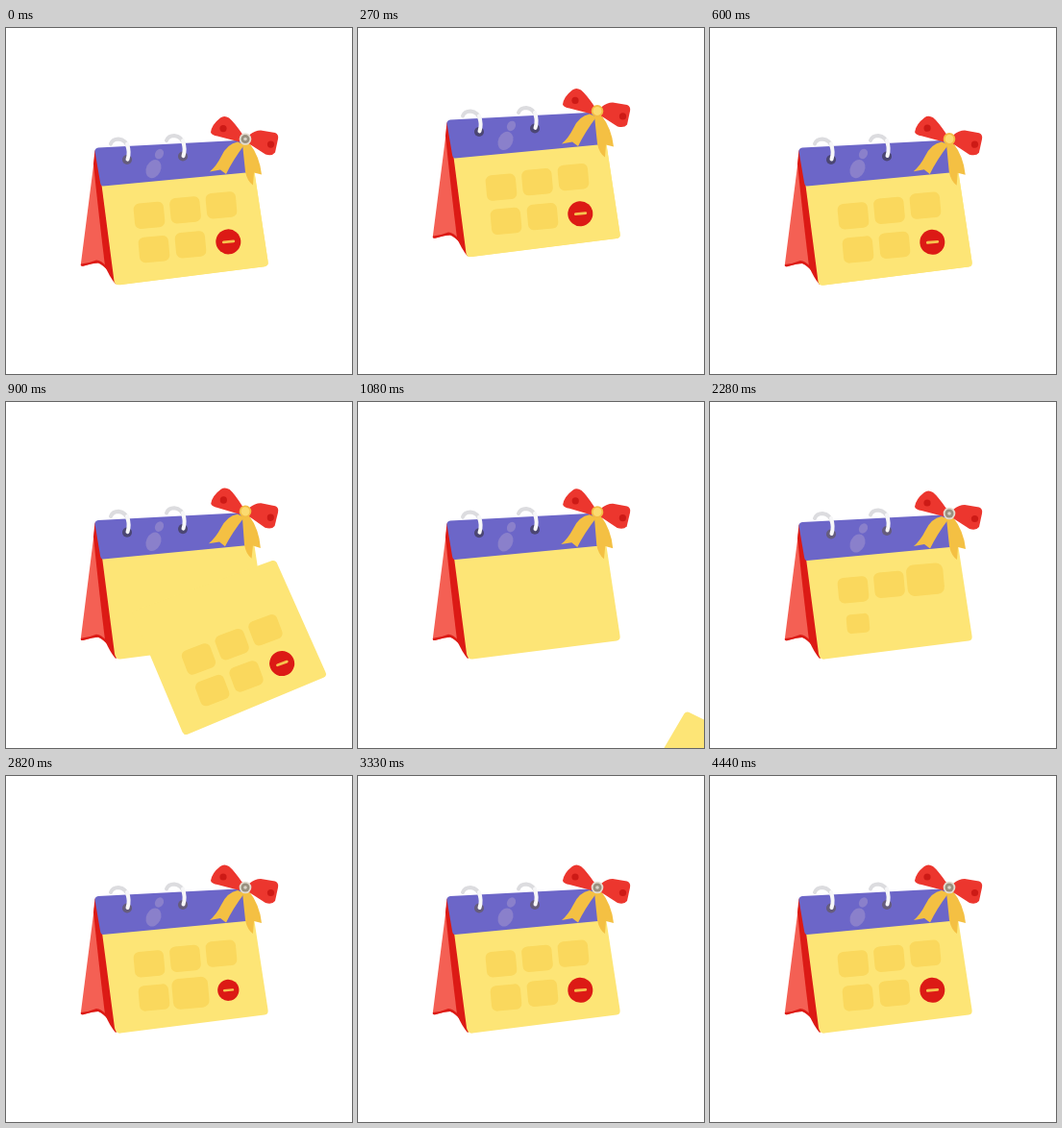
Write an HTML page with a canvas that moves like this. It is 360 by 360 pixels and loops after 4.5 s.

```html
<!DOCTYPE html>
<html lang="en">
<head>
<meta charset="utf-8">
<title>Calendar</title>
<style>
html, body { margin: 0; width: 100%; height: 100%; overflow: hidden; background: #fff; }
canvas { display: block; width: 360px; height: 360px; }
</style>
</head>
<body>
<canvas id="stage" width="360" height="360"></canvas>
<script>
const ctx = document.getElementById('stage').getContext('2d');
const LOOP = 4500;
const PAGE = '#fde576', CELL = '#fad85d', RED = '#dc1a15', BOW = '#ec362e', TAIL = '#f4c043';
const CELLS = [[149, 195.3], [186.5, 189.8], [224, 184.7], [154, 230.5], [192, 225.8], [231.3, 222.8]];
const KNOT = [249, 116];

const clamp = x => Math.max(0, Math.min(1, x));
const smooth = x => x * x * (3 - 2 * x);

function fillPath(d, color) {
  ctx.fillStyle = color;
  ctx.fill(new Path2D(d));
}

function strokePath(d, color, width) {
  ctx.strokeStyle = color;
  ctx.lineWidth = width;
  ctx.stroke(new Path2D(d));
}

function ellipse(x, y, rx, ry, color, tilt = 0) {
  ctx.fillStyle = color;
  ctx.beginPath();
  ctx.ellipse(x, y, rx, ry, tilt, 0, 2 * Math.PI);
  ctx.fill();
}

// Runs draw with the origin at (x, y).
function at(x, y, angle, scale, draw) {
  ctx.save();
  ctx.translate(x, y);
  ctx.rotate(angle);
  ctx.scale(scale, scale);
  draw();
  ctx.restore();
}

function drawCell(i, scale) {
  if (scale <= 0) return;
  const [x, y] = CELLS[i];
  at(x, y, -0.09, scale, () => {
    if (i < 5) {
      ctx.fillStyle = CELL;
      ctx.beginPath();
      ctx.roundRect(-15.7, -13.3, 31.4, 26.6, 6);
      ctx.fill();
    } else {
      ellipse(0, 0, 13, 13, RED);
      strokePath('M-5 0H5.5', '#f6c24f', 2.8);
    }
  });
}

// Scale of a date cell: grows past full size, then settles.
function popScale(t, i) {
  const age = t - 1380 - 260 * i;
  if (age <= 0) return 0;
  if (age < 300) return 1.27 * Math.sin(age / 300 * Math.PI / 2);
  return 1.27 - 0.27 * smooth(clamp((age - 300) / 300));
}

function drawSide() {
  fillPath('M92.5 132L78 245Q77 249 81 248Q91 245 96 245Q101 247 107 254L98 165Z', '#f46054');
  fillPath('M78 246Q77 249 81 248Q91 245 96 245Q101 247 106 253L105 249Q99 242 94 242Q87 245 78 246Z', RED);
  fillPath('M92.5 127L91 142Q97 200 103 248Q108 260 114 267L118 264L103 164Z', RED);
}

function drawBase() {
  fillPath('M100 163L258 148L272.5 243Q273.5 248 269 248.6L119 267.6Q114 268 113 262Z', PAGE);
}

function drawLoosePage(t) {
  if (t > 1110) return;
  const p = Math.pow(Math.max(0, t - 630) / 270, 2.5);
  at(187 + 53 * p, 208 + 61 * p, -0.267 * p, 1, () => {
    ctx.translate(-187, -208);
    fillPath('M95 129L250 117Q253 117 254 120L272.5 243Q273.5 248 269 248.6L117 267.7Q113.5 268 112.5 264Z', PAGE);
    CELLS.forEach((c, i) => drawCell(i, 1));
  });
}

function drawHeader(vivid) {
  fillPath('M96 125L250 117L255 150.5L101 165Q98.5 165 98 161L92.5 129Q92.5 125.5 96 125Z', '#6c66c8');
  ellipse(153.5, 147, 7.5, 10, '#8a80cb', 0.45);
  ellipse(159.5, 131.5, 4.3, 5.5, '#8a80cb', 0.5);
  for (const [x, y] of [[0, 0], [58, -3.5]]) {
    ctx.save();
    ctx.translate(x, y);
    ellipse(126, 137.5, 5, 5, vivid ? '#4b4673' : '#655c7c');
    strokePath('M109 121Q111 116 117 116Q125 117 127 125', '#dcdcdf', 4);
    strokePath('M126 121Q129 130 126.5 137', '#f7f7f8', 4);
    ctx.restore();
  }
}

function drawBow(sway, vivid) {
  at(...KNOT, sway, 1, () => {
    ctx.translate(-KNOT[0], -KNOT[1]);
    fillPath('M241 119Q230 121 224 134Q219 144 212 150L223 148L229 152.5Q236 138 248 122Z', TAIL);
    fillPath('M246 121L249 150Q251 160 257 164L258 151L266 153Q264 134 253 120Z', TAIL);
    fillPath('M246 111Q237 98 232 94Q227 91 223 94Q214 101 213 109Q214 112 220 113L243 119Z', BOW);
    fillPath('M253 112Q259 107 265 107L280 109.5Q284 111 283 116L280 130Q277 134 270 132L253 121Z', BOW);
    ellipse(226, 105, 3.6, 3.6, '#cd1a16');
    ellipse(275.5, 121.5, 3.6, 3.6, '#cd1a16');
    ellipse(...KNOT, 6.3, 6.3, vivid ? '#f3bd45' : '#e3dccf');
    ellipse(...KNOT, 4.5, 4.5, vivid ? '#fbdb70' : '#98907f');
    if (!vivid) ellipse(...KNOT, 1.8, 1.8, '#d9d3c8');
  });
}

// Stretches what draw paints upwards from the foot of the calendar.
function stretched(amount, draw) {
  ctx.save();
  ctx.translate(0, 268);
  ctx.scale(1, 1 + amount);
  ctx.translate(0, -268);
  draw();
  ctx.restore();
}

function render(t) {
  const lift = t < 346 ? 47 * Math.sin(Math.PI * t / 346) : 0;
  const pull = Math.sin(Math.PI * clamp((t - 540) / 720));
  const vivid = t > 30 && t < 1140;
  ctx.fillStyle = '#fff';
  ctx.fillRect(0, 0, 360, 360);
  ctx.save();
  ctx.translate(0, -lift);
  stretched(0.014 * pull, () => {
    drawSide();
    drawBase();
  });
  if (t < 1140) drawLoosePage(t);
  else CELLS.forEach((c, i) => drawCell(i, popScale(t, i)));
  stretched(0.014 * pull, () => {
    drawHeader(vivid);
    drawBow(0.03 * pull, vivid);
  });
  ctx.restore();
}

ctx.lineCap = 'round';
const start = performance.now();
function frame() {
  render((performance.now() - start) % LOOP);
  requestAnimationFrame(frame);
}
frame();
</script>
</body>
</html>
```
